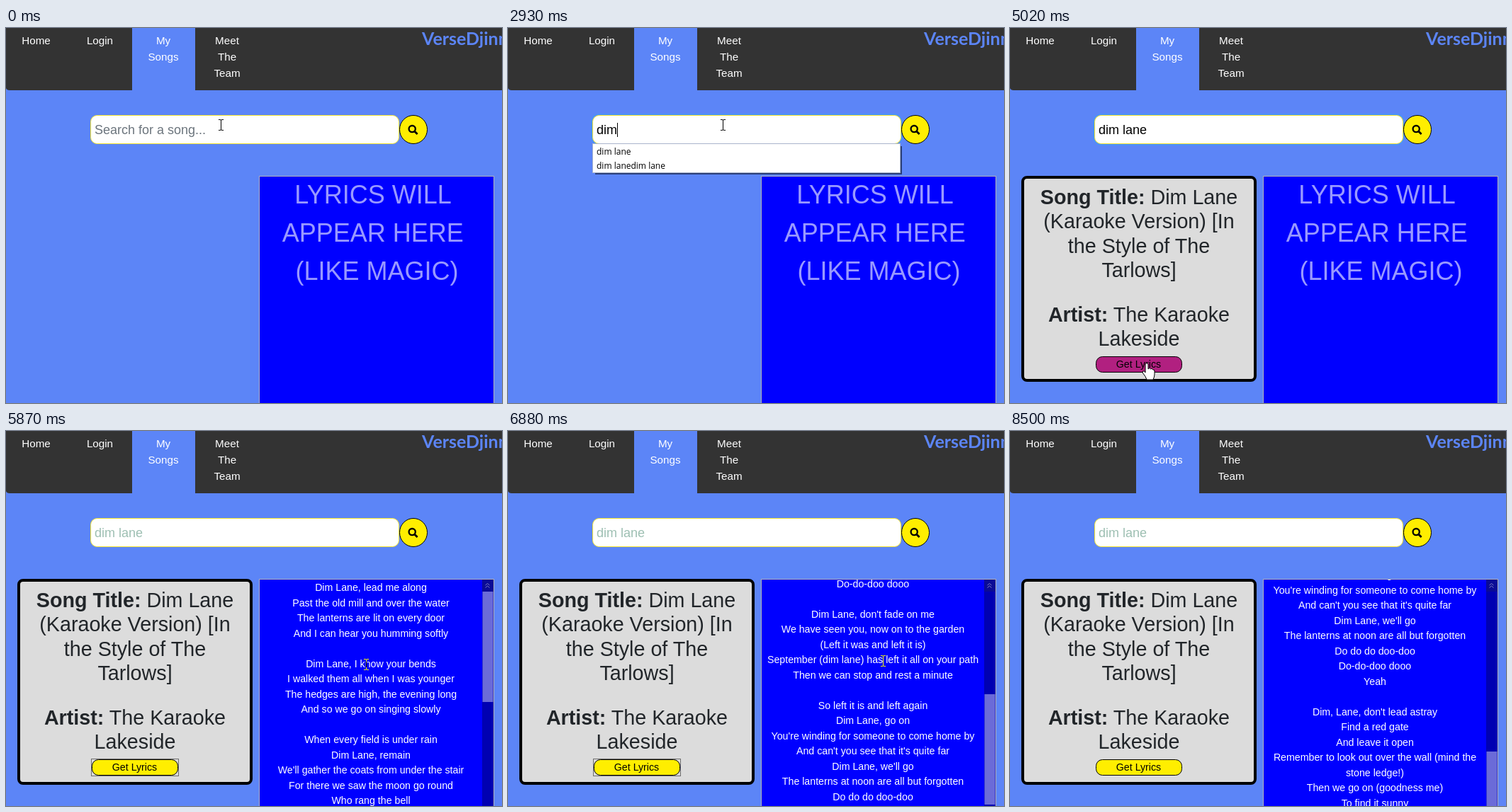
An HTML page for the animation above (8600 ms loop, 700 by 530 pixels).

```html
<!DOCTYPE html>
<html lang="en">
<head>
<meta charset="utf-8">
<title>Song search</title>
<style>
  html, body { margin: 0; width: 100%; height: 100%; overflow: hidden; background: #5c85f7; }
  svg { display: block; width: 700px; height: 530px; font-family: "Liberation Sans", Arial, sans-serif; }
  text { white-space: pre; }
  .mid { text-anchor: middle; }
  .nav { font-size: 15.2px; fill: #fff; }
  .brand { font: 700 25px Lato, sans-serif; fill: #5c85f7; }
  .field { font-size: 18px; }
  .box { fill: #fff; stroke: #f3e431; }
  .ring { fill: none; stroke: #4a92fc; stroke-width: 2; }
  .hint { font-size: 36px; fill: #9999ff; }
  .lyrics { font-size: 14.2px; fill: #fff; }
  .title { font-size: 28.7px; fill: #212529; }
  .title tspan { font-weight: 700; }
  .get { font-size: 14.2px; }
  .list text { font: 12px "Open Sans", sans-serif; }
  .beam { fill: none; stroke: #fff; mix-blend-mode: difference; }
  .pointer { fill: #fff; stroke: #000; stroke-linejoin: round; }
</style>
</head>
<body>
<svg viewBox="0 0 700 530">
  <defs>
    <clipPath id="view"><rect x="358" y="210" width="314" height="320"/></clipPath>
  </defs>
  <rect width="700" height="530" fill="#5c85f7"/>

  <path d="M0 0H700V88H5Q1 88 0 85Z" fill="#333"/>
  <rect x="178" width="89" height="88" fill="#5c85f7"/>
  <g class="nav mid">
    <text x="42.5" y="23">Home</text>
    <text x="132.5" y="23">Login</text>
    <text x="222" y="23">My</text>
    <text x="222" y="46">Songs</text>
    <text x="312" y="23">Meet</text>
    <text x="312" y="46">The</text>
    <text x="312" y="69">Team</text>
  </g>
  <text class="brand" x="587" y="24">VerseDjinn</text>

  <rect id="ring" class="ring" x="118" y="122" width="438" height="43" rx="11"/>
  <rect class="box" x="119.5" y="123.5" width="435" height="40" rx="9"/>
  <text id="typed" class="field" x="125" y="150"></text>
  <path id="caret" d="M125.5 134V154" stroke="#000"/>
  <ellipse cx="575" cy="143.5" rx="19.5" ry="20" fill="#ffee00" stroke="#000"/>
  <g fill="none" stroke="#000">
    <circle cx="573.2" cy="142.6" r="4.6" stroke-width="2.3"/>
    <path d="M576.8 146.2L580.6 150" stroke-width="2.8"/>
  </g>

  <rect x="357.5" y="209.5" width="331" height="340" fill="#0000ff" stroke="#b0b0b4"/>
  <g id="hint" class="hint mid">
    <text x="518" y="248.4">LYRICS WILL</text>
    <text x="517.7" y="302.4">APPEAR HERE</text>
    <text x="523.5" y="356.4">(LIKE MAGIC)</text>
  </g>
  <g id="song">
    <g clip-path="url(#view)"><g id="lyrics" class="lyrics mid"></g></g>
    <rect x="672" y="210" width="16" height="320" fill="#0000b2"/>
    <rect x="672" y="210" width="16" height="17" fill="#0a0a96"/>
    <path d="M676.5 218L679.5 215.5L682.5 218M676.5 221.5L679.5 219L682.5 221.5" fill="none" stroke="#7c7cc4"/>
    <rect id="thumb" x="672.5" y="227" width="15" height="156" fill="#6b6bd8"/>
  </g>

  <g id="card">
    <rect x="18" y="211" width="328" height="287" rx="6" fill="#dcdcdc" stroke="#000" stroke-width="4"/>
    <g class="title mid">
      <text x="182" y="249"><tspan>Song Title:</tspan> Dim Lane</text>
      <text x="182" y="283.4">(Karaoke Version) [In</text>
      <text x="182" y="317.7">the Style of The</text>
      <text x="182" y="352">Tarlows]</text>
      <text x="182" y="415"><tspan>Artist:</tspan> The Karaoke</text>
      <text x="182" y="449.3">Lakeside</text>
    </g>
    <rect id="button" x="121.5" y="464.5" width="121" height="22" rx="9" stroke="#000"/>
    <text class="get mid" x="181.5" y="480">Get Lyrics</text>
    <rect id="outline" x="120.5" y="463.5" width="123" height="24" fill="none" stroke="#000" stroke-dasharray="1 1"/>
  </g>

  <g id="list" class="list">
    <rect id="shade" x="123" y="167" width="433" fill="#2b3f78"/>
    <rect id="sheet" x="119.5" y="163.5" width="434" fill="#fff" stroke="#a9b4cc"/>
    <text x="125" y="179">dim lane</text>
    <text x="125" y="199">dim lanedim lane</text>
    <text x="125" y="219">distant hills</text>
    <text x="125" y="239">dusty road</text>
  </g>

  <path id="beam" class="beam" d="M-3 -7.5H-1L0.5 -7L2 -7.5H4M0.5 -7V7M-3 7.5H-1L0.5 7L2 7.5H4"/>
  <path id="arrow" class="pointer" d="M0 0V16L4 12.5L6.5 18.5L9 17.5L6.5 11.5H11.5Z"/>
  <path id="hand" class="pointer" d="M-2 2Q0 -1 2 2V9Q4 6 5.5 9Q7.5 7 8.5 10Q11 9 11 12V16Q11 20 9 24H0Q-1 20 -6 14Q-6 11 -3.5 12L-2 14Z"/>
</svg>
<script>
const LOOP = 8600, LINE = 21.5;
const QUERY = "dim lane";
const TYPE_START = 2650, TYPE_STEP = 137;
const FOCUS = 150, RESULT = 3890, HOVER = 4880, CLICK = 5170, DIM = 5320, LOADED = 5600;

const words = `Dim Lane, lead me along
Past the old mill and over the water
The lanterns are lit on every door
And I can hear you humming softly

Dim Lane, I know your bends
I walked them all when I was younger
The hedges are high, the evening long
And so we go on singing slowly

When every field is under rain
Dim Lane, remain
We'll gather the coats from under the stair
For there we saw the moon go round
Who rang the bell
By morning the wind a little warmer
Do do do doo-doo
Do-do-doo dooo

Dim Lane, don't fade on me
We have seen you, now on to the garden
(Left it was and left it is)
September (dim lane) has left it all on your path
Then we can stop and rest a minute

So left it is and left again
Dim Lane, go on
You're winding for someone to come home by
And can't you see that it's quite far
Dim Lane, we'll go
The lanterns at noon are all but forgotten
Do do do doo-doo
Do-do-doo dooo
Yeah

Dim, Lane, don't lead astray
Find a red gate
And leave it open
Remember to look out over the wall (mind the
stone ledge!)
Then we go on (goodness me)
To find it sunny`.split("\n");

// Held values: [start time, ...value]
const pointer = [
  [0, "beam", 303, 137], [4170, "beam", 301, 152], [4320, "beam", 290, 232],
  [4460, "beam", 262, 335], [4600, "beam", 236, 432], [4740, "arrow", 208, 498],
  [4880, "hand", 195, 478], [5020, "hand", 193, 473],
  [5320, "arrow", 262, 462], [5460, "arrow", 372, 418], [5600, "beam", 458, 362],
  [5750, "beam", 508, 330], [5890, "beam", 526, 318], [6030, "beam", 528, 316],
  [6600, "beam", 528, 319], [6740, "beam", 529, 322], [6880, "beam", 529, 325],
  [8030, "none", 0, 0]
];
const scroll = [
  [0, 0], [6180, 45], [6320, 118], [6450, 189], [6600, 258], [6740, 320], [6880, 371],
  [7000, 402], [7140, 434], [7290, 467], [7430, 499],
  [7580, 520], [7730, 544], [7880, 564], [8030, 577]
];
const caretFlips = [150, 580, 1040, 1630, 2090, 3740, 4320, 4740];

const $ = id => document.getElementById(id);
const show = (id, on) => $(id).style.display = on ? "" : "none";
const held = (list, t) => list.filter(k => k[0] <= t).pop();

words.forEach((line, i) => {
  const el = document.createElementNS("http://www.w3.org/2000/svg", "text");
  el.setAttribute("x", 515);
  el.setAttribute("y", 226 + i * LINE);
  el.textContent = line;
  $("lyrics").append(el);
});

function drawSearch(t) {
  const count = t < TYPE_START ? 0 : Math.min(QUERY.length, 1 + Math.floor((t - TYPE_START) / TYPE_STEP));
  const typed = $("typed");
  typed.textContent = count ? QUERY.slice(0, count) : "Search for a song...";
  typed.setAttribute("fill", !count ? "#6c757d" : t < DIM ? "#000" : "#9dbfb2");
  show("ring", t >= FOCUS && t < CLICK);
  show("caret", caretFlips.filter(f => f <= t).length % 2);
  const x = count ? typed.getComputedTextLength() : 0;
  $("caret").setAttribute("transform", `translate(${Math.round(x)})`);

  show("list", count > 0 && t < RESULT);
  const rows = Math.max(2, 5 - count);
  $("list").querySelectorAll("text").forEach((el, i) => el.style.display = i < rows ? "" : "none");
  $("sheet").setAttribute("height", rows * 20 + 1);
  $("shade").setAttribute("height", rows * 20);
}

function drawResult(t) {
  show("card", t >= RESULT);
  $("button").setAttribute("fill", t >= HOVER && t < DIM ? "#b12080" : "#ffee00");
  show("outline", t >= CLICK && t < 8500);
  show("hint", t < LOADED);
  show("song", t >= LOADED);
  const y = held(scroll, t)[1];
  $("lyrics").setAttribute("transform", `translate(0 ${-y})`);
  $("thumb").setAttribute("y", 227 + Math.round(y / 2.55));
}

function drawPointer(t) {
  const [, kind, x, y] = held(pointer, t);
  for (const id of ["beam", "arrow", "hand"]) show(id, id === kind);
  if (kind !== "none") $(kind).setAttribute("transform", `translate(${x} ${y})`);
}

const start = performance.now();
function frame() {
  const t = (performance.now() - start) % LOOP;
  drawSearch(t);
  drawResult(t);
  drawPointer(t);
  requestAnimationFrame(frame);
}
frame();
</script>
</body>
</html>
```
